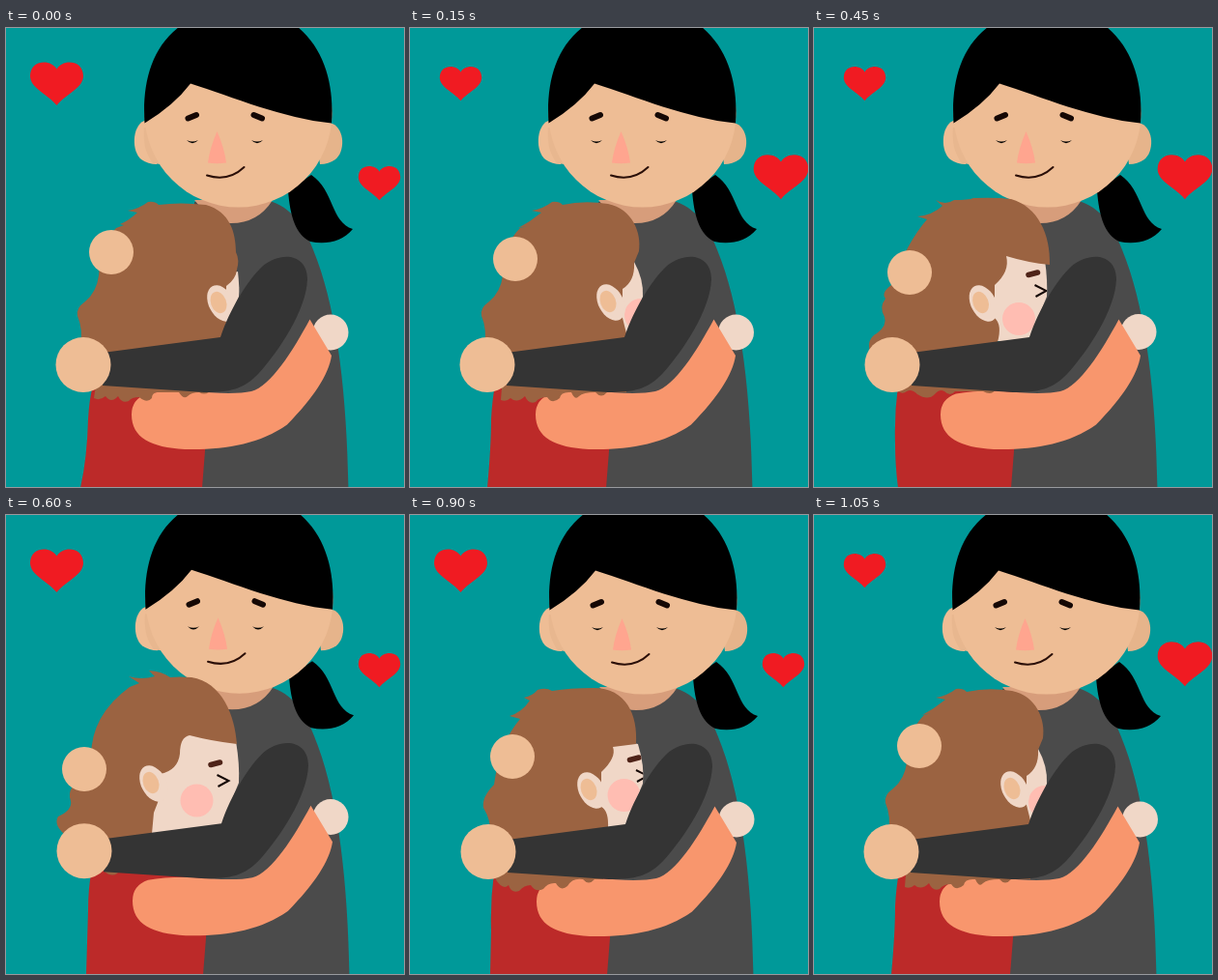
An HTML page for the animation above (1200 ms loop, 412 by 475 pixels).

```html
<!DOCTYPE html>
<html lang="en">
<head>
<meta charset="utf-8">
<title>Hug</title>
<style>
html, body { margin: 0; width: 100%; height: 100%; overflow: hidden; background: #099; }
svg { display: block; width: 412px; height: 475px; }
.skin { fill: #eebd95; }
.pale { fill: #f0d7c7; }
.brown { fill: #9b6341; }
.line { fill: none; stroke: #150805; stroke-width: 2; stroke-linecap: round; }
</style>
</head>
<body>
<svg viewBox="0 0 412 475">
  <defs>
    <path id="heart" fill="#f01b22" d="M0-15C-5-25-27-26-27.500-8C-27.500 5-9 11 0 22.500C9 11 27.500 5 27.500-8C27-26 5-25 0-15Z"/>
    <clipPath id="faceClip"><path id="faceClipShape"/></clipPath>
  </defs>
  <rect width="412" height="475" fill="#099"/>
  <use id="leftHeart" href="#heart"/>
  <use id="rightHeart" href="#heart"/>

  <g class="sway">
    <path fill="#4b4b4b" d="M195 180H276C299 188 312 211 322 240C344 300 353 385 354.500 480H195Z"/>
    <path fill="#d79d7b" d="M195 178Q214 202 233 202Q261 202 276 178Z"/>
    <path d="M292 168L316 152C340 168 336 201 359 208C348 222 330 224 315 221C300 214 294 195 292 168Z"/>
    <path class="skin" d="M143 96C130 102 130 128 140 136Q147 141 156 141L165 100Z"/>
    <path fill="#e8b78f" d="M143 103Q141 126 152 140L160 141L150 103Z"/>
    <path fill="#e6b48b" d="M338 99C351 105 351 128 341 136Q334 141 325 141L320 100Z"/>
    <circle class="skin" cx="240.500" cy="88.500" r="97"/>
    <path d="M143.500 98.500C141 60 149 22 179-1H302C330 22 340 60 337 98.500C287 93.500 235 71.500 191 57.500Q174 80 143.500 98.500Z"/>
    <path class="line" style="stroke-width:6" d="M188.500 93.500L197 90M256.500 90L265 93.500"/>
    <path d="M187 116Q193 119 199 116Q193 122.500 187 116ZM254 116Q260 119 266 116Q260 122.500 254 116Z"/>
    <path fill="#ffa58f" d="M218.500 107Q211 124 209 139.500Q218 141 228 139.500Q226 124 218.500 107Z"/>
    <path class="line" style="stroke:#2b0f08" d="M208 152.500Q230 159.500 246.500 144"/>
  </g>

  <path id="dress" fill="#bc2a29"/>
  <circle id="childHand" class="pale" r="18.500"/>
  <path class="sway" fill="#f8966d" d="M130 400Q130 384 146 378.500Q165 375 190 375.500Q235 380 254 376C274 371 297 334 314.500 301.500L337 339C334 359 318 383 291 410.500C262 431 225 437 185 436C150 434 130 424 130 400Z"/>
  <path id="face" class="pale"/>
  <g clip-path="url(#faceClip)">
    <circle id="cheek" r="17" fill="#ffbdb2"/>
    <g id="eye">
      <path class="line" style="stroke:#4f2318;stroke-width:5.500" d="M-7.500-16.500L2-19"/>
      <path class="line" style="stroke-linecap:butt" d="M-1-6L11 0L0 6"/>
    </g>
  </g>
  <path id="hair" class="brown"/>
  <g id="ear">
    <ellipse class="pale" rx="13" ry="20" transform="translate(2 0) rotate(-28)"/>
    <ellipse rx="8" ry="11.500" fill="#eebd95" transform="translate(-1 -1) rotate(-20)"/>
  </g>
  <g class="sway">
    <path fill="#343434" d="M100 336L222 320C232 290 251 260 265 247C285 230 312 234 312 260C311 292 282 335 262 357C246 374 232 377 205 377L100 370Z"/>
    <circle class="skin" cx="80" cy="348.500" r="28.500"/>
  </g>
  <circle id="motherHand" class="skin" r="23"/>
</svg>
<script>
// Five head poses, from turned away to fully in profile.
const poses = [
  {
    sway: [0, 0], childHand: [336, 315], motherHand: [109, 232], ear: [221, 285],
    cheek: [262, 296], eye: [275, 270],
    dress: "M90 370Q86 385 85 405Q84 445 77 476H203L207 425V370Z",
    hair: "M126 189Q138 187 147 180Q154 179 158 183Q180 180 207 183C232 190 238 212 238 232Q242 240 239 250Q238 260 228 267V305L210 377Q205 380 200 377Q192 377 188 381Q184 385 179 377H156Q151 378 151 383Q146 389 138 382Q130 382 127 386Q120 389 116 381Q109 389 103 381Q97 386 91 383Q92 376 93 370L77 330Q80 312 74 298Q72 290 82 283Q94 273 96 256Q98 222 114 207L122 204L118 203Q126 200 136 191Z",
    face: "M240 252Q242 270 241 278L228 308L215 300L225 255Z"
  },
  {
    sway: [0, 0], childHand: [337.5, 315], motherHand: [109, 239], ear: [206, 284],
    cheek: [239, 297], eye: [254, 270],
    dress: "M88 370Q85 385 84 405Q84 432 80 476H203L207 425V370Z",
    hair: "M126 189Q138 187 147 180Q154 179 158 183Q180 178 205 182C230 187 240 212 237 231L232 243Q233 262 220 270V300L225 320L224 377H204Q198 384 192 377Q179 377 175 381Q171 386 167 377Q156 376 155 383Q147 390 142 382Q134 382 130 387Q123 390 119 381Q111 389 104 383Q100 387 94 385L95 372L77 330Q80 312 74 298Q72 290 82 283Q94 273 96 256Q98 222 114 207L121 205L112 207Q125 200 136 191Z",
    face: "M232 242Q242 260 241 278L224 322L210 306V260Z"
  },
  {
    sway: [1, 0], childHand: [338, 315], motherHand: [106, 250], ear: [186, 285],
    cheek: [221.5, 290], eye: [235, 270],
    dress: "M87 370Q83 400 84 430L83 476H204L208 425V370Z",
    hair: "M118 189Q127 187 132 181Q141 178 147 182Q165 179 190 179C224 179 236 207 234 237L210 240Q214 251 198 266V302Q206 306 205 325L200 377H191Q185 384 179 377Q168 375 163 384Q156 390 151 381Q143 380 138 387Q130 391 125 383Q118 383 113 389Q105 392 102 383Q96 389 88 376L83 330Q84 316 76 303Q74 292 87 279Q93 235 114 211L103 208Q116 204 124 192Z",
    face: "M200 230L236 237Q243 260 241 278L222 324H195V260Z"
  },
  {
    sway: [1, 0], childHand: [336, 314.5], motherHand: [99, 253], ear: [173.5, 285],
    cheek: [212, 301], eye: [229.5, 272],
    dress: "M87 370Q83 400 84 430Q84 452 87 476H204L208 425V370Z",
    hair: "M126 178Q136 184 145 178Q160 178 165 176Q188 175 204 177C232 185 245 214 244 245Q222 243 199 236Q203 252 187 266V300Q195 307 190 325L188 374Q184 381 175 376H146Q141 382 135 376Q130 373 125 379Q118 386 107 379Q101 373 96 376Q91 380 86 375L58 335Q54 322 65 316Q76 308 73 299Q67 289 74 280Q69 274 80 266Q96 222 117 198L107 195Q122 194 133 184Z",
    face: "M190 230L239 240Q242 262 241 278L222 324H185V260Z"
  },
  {
    sway: [1, -.8], childHand: [336, 312.5], motherHand: [81, 263], ear: [151, 278],
    cheek: [197.5, 295.5], eye: [219.5, 275],
    dress: "M89 366Q85 385 85 410L83 476H204L208 425V366Z",
    hair: "M127 167Q140 171 154 167L148 161Q162 162 170 168Q180 167 192 168C224 173 237 208 239 237Q213 234 190 228Q180 230 180 247Q178 264 160 268V290L153 308L151 330L135 369Q117 367 115 371Q109 375 102 369L60 330Q49 320 54 312Q69 305 67 296Q64 288 69 281L88 250Q88 207 128 178L138 174Z",
    face: "M180 222L238 234Q242 258 241 277L222 324L150 332L144 292L155 260Z"
  }
];
const order = [0, 1, 2, 3, 4, 3, 2, 1];
const stepMs = 150;
const $ = id => document.getElementById(id);
const place = (el, [x, y], scale = 1) =>
  el.setAttribute("transform", `translate(${x} ${y}) scale(${scale})`);

function draw(step) {
  const pose = poses[order[step]];
  for (const el of document.querySelectorAll(".sway")) place(el, pose.sway);
  for (const id of ["childHand", "motherHand", "ear", "cheek", "eye"]) place($(id), pose[id]);
  for (const id of ["dress", "hair", "face"]) $(id).setAttribute("d", pose[id]);
  $("faceClipShape").setAttribute("d", pose.face);

  // The hearts beat in turn.
  const leftBig = step % 2 === 0;
  place($("leftHeart"), [52.5, 57.5], leftBig ? 1 : .79);
  place($("rightHeart"), leftBig ? [386.5, 160.5] : [384, 154], leftBig ? .79 : 1.03);
}

let shown = -1;
function tick() {
  const step = Math.floor(performance.now() / stepMs) % order.length;
  if (step !== shown) draw(shown = step);
  requestAnimationFrame(tick);
}
tick();
</script>
</body>
</html>
```
